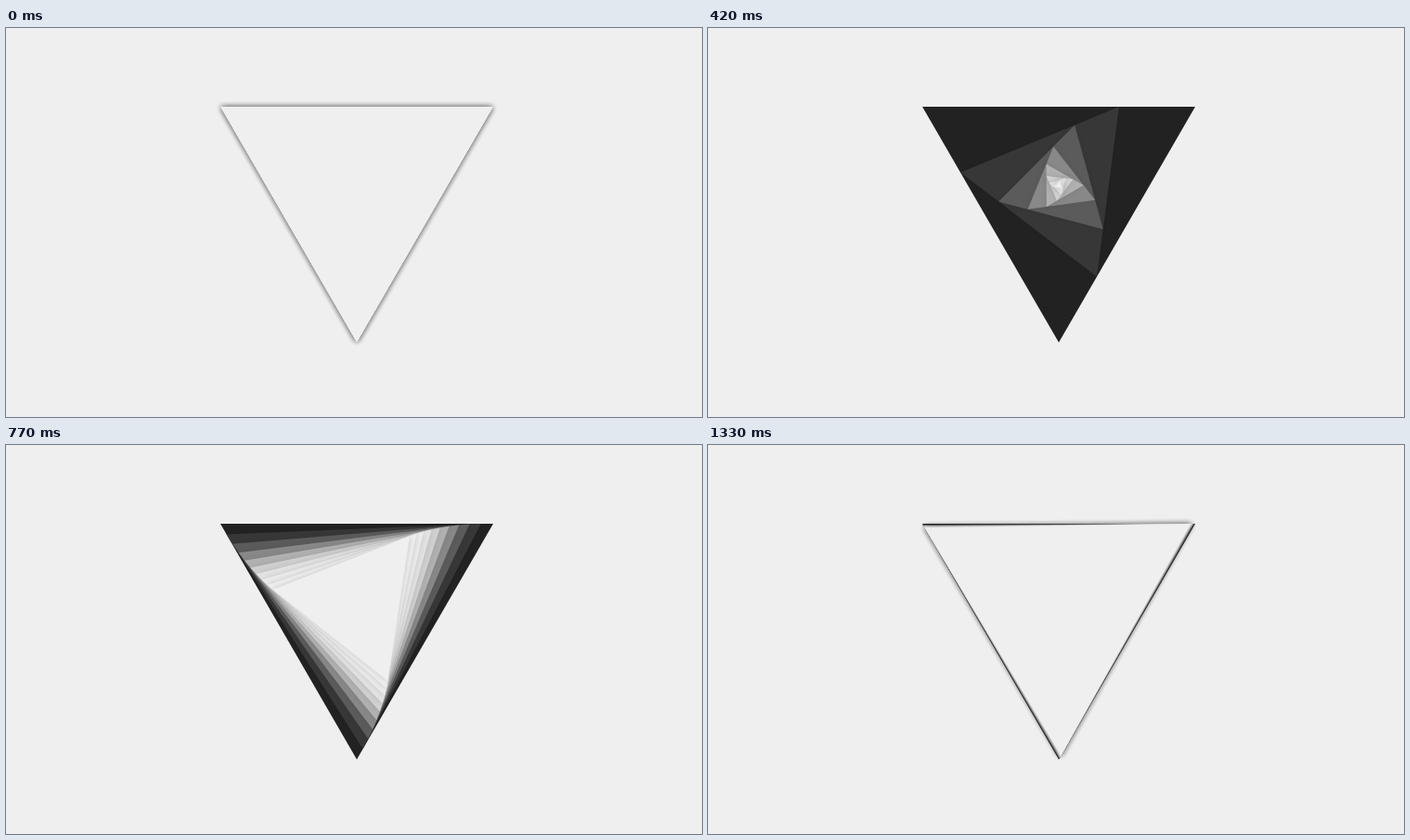
These frames come from a looping animation (750x420 px, 1.4 s). An HTML page with a canvas:

```html
<!DOCTYPE html>
<html lang="en">
<head>
<meta charset="utf-8">
<title>Nested triangles</title>
<style>
  html, body { margin: 0; width: 100%; height: 100%; overflow: hidden; background: #efefef; }
  canvas { display: block; }
</style>
</head>
<body>
<canvas id="stage" width="750" height="420"></canvas>
<script>
const ctx = document.getElementById('stage').getContext('2d');
const STEP = 70;
const STEPS = 20;
const LAYERS = 10;
const DARK = 34;
const LIGHT = 239;
const OUTER = [[231, 85], [525, 85], [378, 339.6]];

// How far each corner has slid along its parent's side: soft start, exponential settle.
function slide(step) {
  const last = STEPS - 1;
  const n = (step + last) % STEPS;
  const rise = Math.cbrt(n ** 3 + 1.6 ** 3) - 1.6;
  return 1 - Math.exp(-0.356 * rise) * (1 - n / last) ** 0.15;
}

const inscribe = (tri, k) => tri.map(([x, y], i) => {
  const [nx, ny] = tri[(i + 1) % 3];
  return [x + (nx - x) * k, y + (ny - y) * k];
});

function fillTriangle(tri, shade, shadow) {
  ctx.shadowColor = `rgba(0, 0, 0, ${shadow})`;
  ctx.fillStyle = `rgb(${shade}, ${shade}, ${shade})`;
  ctx.beginPath();
  tri.forEach(([x, y]) => ctx.lineTo(x, y));
  ctx.closePath();
  ctx.fill();
}

function draw(step) {
  ctx.shadowColor = 'transparent';
  ctx.fillStyle = '#efefef';
  ctx.fillRect(0, 0, 750, 420);
  ctx.shadowBlur = 6;
  const k = slide(step);
  let tri = OUTER;
  let shade = DARK;
  for (let i = 0; i < LAYERS; i++) {
    // Each layer veils the one below a little more than the last.
    const veil = i / LAYERS;
    shade += (LIGHT - shade) * veil;
    fillTriangle(tri, Math.round(shade), 0.2 * veil);
    tri = inscribe(tri, k);
  }
}

const start = performance.now();
function tick(now) {
  draw(Math.floor(Math.max(0, now - start) / STEP) % STEPS);
  requestAnimationFrame(tick);
}
draw(0);
requestAnimationFrame(tick);
</script>
</body>
</html>
```
